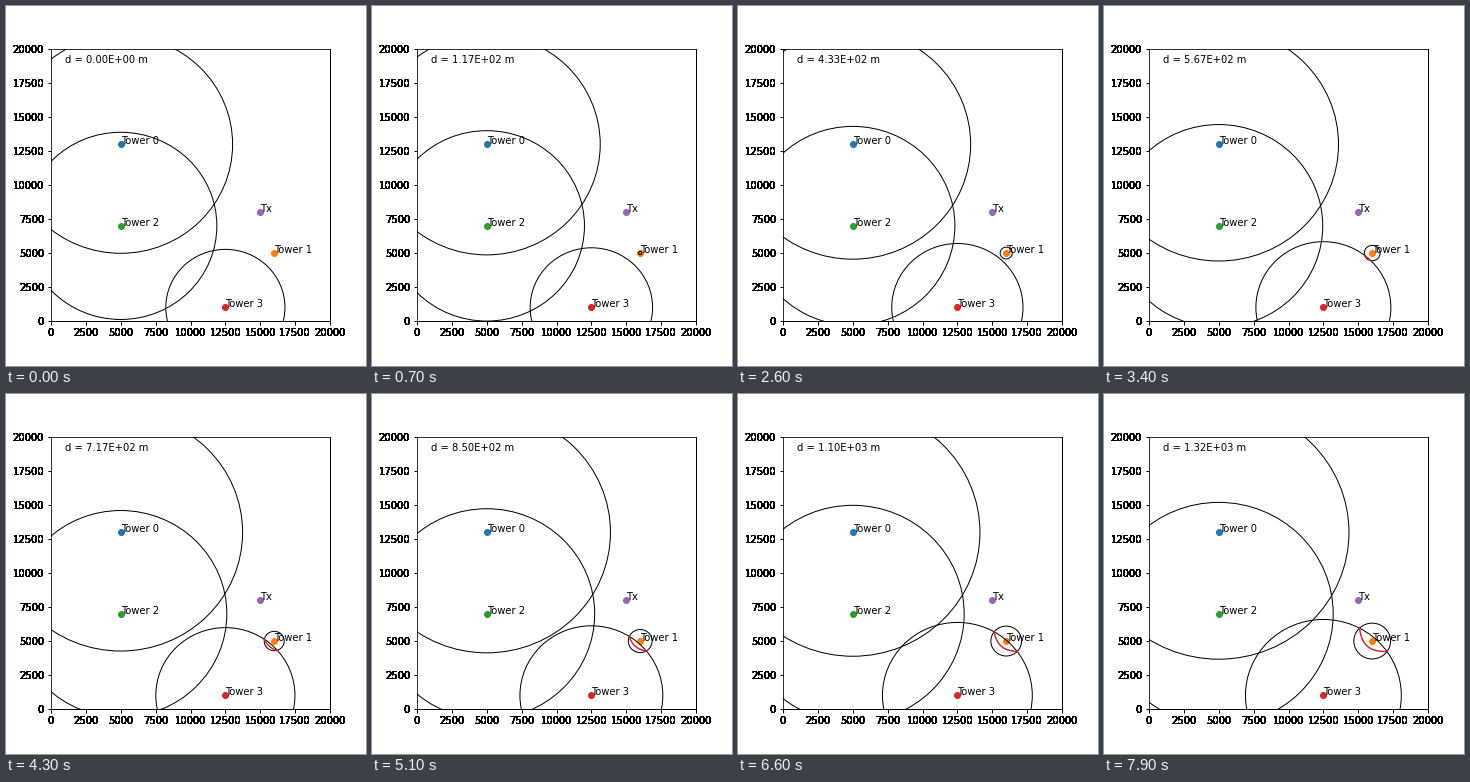
A matplotlib script for the animation above (8 s loop, 360 by 360 pixels).

```python
import numpy as np
import matplotlib.pyplot as plt
from matplotlib.animation import FuncAnimation

FRAMES, INTERVAL = 80, 100
STEP = 100 / 6            # metres travelled per frame
SIZE = 20000
LABEL_PASSES = 16         # repeated drawing hardens the label edges

towers = np.array([[5000, 13000], [16000, 5000], [5000, 7000], [12500, 1000]], float)
tx = np.array([15000, 8000], float)
dist = np.hypot(*(towers - tx).T)
first = dist.argmin()
lead = dist - dist[first]

plt.rcParams.update({"font.family": "DejaVu Sans", "font.size": 10})
fig = plt.figure(figsize=(5, 5), dpi=72, facecolor="white")
ax = fig.add_axes([0.125, 0.125, 0.775, 0.755])
ax.set(xlim=(0, SIZE), ylim=(0, SIZE))

ticks = range(0, SIZE + 1, 2500)
ax.set_xticks(ticks)
ax.set_yticks(ticks)
ax.tick_params(width=1, labelbottom=False, labelleft=False)
for side in ("right", "bottom"):
    ax.spines[side].set_linewidth(1)

x_tr, x_va, x_ha = ax.get_xaxis_text1_transform(7)
y_tr, y_va, y_ha = ax.get_yaxis_text1_transform(7)
for _ in range(LABEL_PASSES):
    for v in ticks:
        ax.text(v, 0, str(v), transform=x_tr, va=x_va, ha=x_ha)
        ax.text(0, v, str(v), transform=y_tr, va=y_va, ha=y_ha)

names = [f"Tower {i}" for i in range(len(towers))] + ["Tx"]
for name, pos in zip(names, [*towers, tx]):
    ax.scatter(*pos)
    ax.text(*pos, name)

circles = [plt.Circle(pos, 0, fill=False, lw=1) for pos in towers]
for circle in circles:
    ax.add_patch(circle)
loci = [ax.plot([], [], color=f"C{i}", lw=1.5)[0] for i in range(len(towers))]
readout = ax.text(0.05, 0.95, "", transform=ax.transAxes)


def locus(i, radii):
    """Points where the circles of tower i and the first tower cross."""
    axis = towers[i] - towers[first]
    gap = np.hypot(*axis)
    along = axis / gap
    across = np.array([-along[1], along[0]])
    a = (radii**2 - (radii + lead[i])**2 + gap**2) / (2 * gap)
    h2 = radii**2 - a**2
    ok = h2 >= 0
    a, h = a[ok, None], np.sqrt(h2[ok])[:, None]
    mid = towers[first] + a * along
    return np.vstack([(mid + h * across)[::-1], mid - h * across])


def update(k):
    d = k * STEP
    radii = np.arange(k + 1) * STEP
    readout.set_text(f"d = {d:.2E} m")
    for i, (circle, line) in enumerate(zip(circles, loci)):
        circle.set_radius(d + lead[i])
        if i != first:
            line.set_data(*locus(i, radii).T)
    return [*circles, *loci, readout]


anim = FuncAnimation(fig, update, frames=FRAMES, interval=INTERVAL,
                     repeat=True, repeat_delay=0, blit=False)
plt.show()
```
